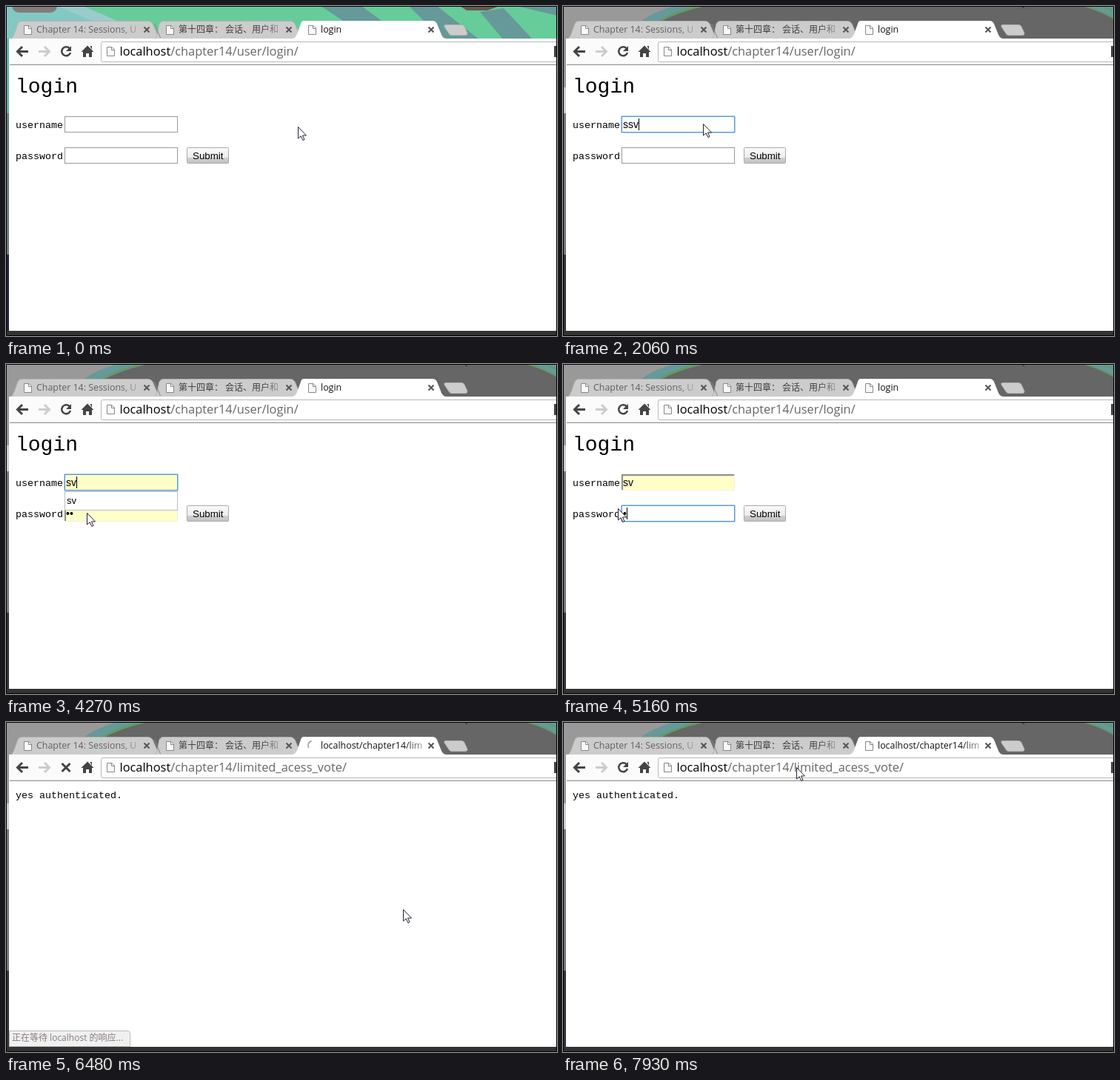
Animation of 744 by 446 pixels, one loop 8 s. Source, as an HTML page:

```html
<!DOCTYPE html>
<html lang="zh">
<head>
<meta charset="utf-8">
<title>login</title>
<style>
html, body { margin: 0; width: 100%; height: 100%; overflow: hidden; background: #000; }
svg { display: block; width: 744px; height: 446px; }
text { white-space: pre; }
.ui { font: 12px "Open Sans", "Noto Sans CJK SC", "Noto Sans CJK", sans-serif; }
.latin { font-size: 12.4px; }
.url { font: 16.4px "Open Sans", sans-serif; fill: #666; }
.mono { font: 13.33px "Liberation Mono", monospace; }
.arial { font: 14px "Liberation Sans", sans-serif; }
.field .body { fill: #fff; stroke: #999; }
.field .halo { fill: none; stroke: #a9cdf0; visibility: hidden; }
.field .inset { fill: none; stroke: #8b8b8b; stroke-width: 2; visibility: hidden; }
.field.focus .body { stroke: #5b9ad6; }
.field.focus .halo { visibility: visible; }
.field.auto .body { fill: #ffffc8; }
.field.auto:not(.focus) .body { stroke: #f0f0e4; }
.field.auto:not(.focus) .inset { visibility: visible; }
</style>
</head>
<body>
<svg viewBox="0 0 744 446">
  <defs>
    <linearGradient id="button" x2="0" y2="1">
      <stop offset="0" stop-color="#fafafa"/><stop offset=".64" stop-color="#ececec"/>
      <stop offset=".66" stop-color="#cfcfcf"/><stop offset="1" stop-color="#c2c2c2"/>
    </linearGradient>
    <linearGradient id="fade1" gradientUnits="userSpaceOnUse" x1="155" x2="188">
      <stop stop-color="#606060"/><stop offset="1" stop-color="#ccc"/>
    </linearGradient>
    <linearGradient id="fade2" gradientUnits="userSpaceOnUse" x1="345" x2="378">
      <stop stop-color="#3c3c3c"/><stop offset="1" stop-color="#bcc4c8"/>
    </linearGradient>
    <linearGradient id="fade3" gradientUnits="userSpaceOnUse" x1="540" x2="570">
      <stop stop-color="#111"/><stop offset="1" stop-color="#ddd"/>
    </linearGradient>
    <clipPath id="titleClip"><path d="M425 20H562V45H425Z"/></clipPath>
    <g id="page"><path d="M.5 .5H7L10.5 4V12.5H.5Z" fill="#f8f8f8" stroke="#888"/><path d="M6.5 .5V4.5H10.5" fill="none" stroke="#888"/></g>
    <path id="close" d="M-3.5-3.5L3.5 3.5M3.5-3.5L-3.5 3.5" stroke="#555" stroke-width="2"/>
  </defs>

  <g id="grayDesk">
    <path d="M0 0H744V446H0Z" fill="#666"/>
    <path d="M0 0H150L108 20V46H0Z" fill="#999"/>
    <path d="M150 0H184Q150 8 130 20H106Q122 8 150 0Z" fill="#669999"/>
    <path d="M186 0Q152 8 131 20" fill="none" stroke="#669966" stroke-width="3"/>
    <path d="M706 0H744V17Q728 7 706 0Z" fill="#669999"/>
    <path d="M704 0Q728 7 744 17M728 0L744 7" fill="none" stroke="#669966" stroke-width="2"/>
    <path d="M620 1l3 2" stroke="#222"/>
    <path d="M1 44H4V110H1Z" fill="#999"/><path d="M1 110H4V145H1Z" fill="#ccc"/>
    <path d="M1 145H4V336H1Z" fill="#777"/><path d="M1 336H4V446H1Z" fill="#333"/>
  </g>
  <g id="greenDesk">
    <path d="M0 0H744V446H0Z" fill="#66cc99"/>
    <path d="M0 0H84L130 20V46H0Z" fill="#84c8c4"/>
    <path d="M70 0H104L150 20H116Z" fill="#99cccc"/>
    <path d="M8 0H69Q68 9 58 9H20Q9 9 8 0Z" fill="#807d7a"/>
    <path d="M425 0H480L507 20H455ZM544 0H582L640 46H590ZM640 8L672 3L712 46H672ZM690 0H744V13Z" fill="#669999"/>
    <path d="M613 0H666L650 6H622Z" fill="#665a50"/>
    <path d="M1 44H4V145H1Z" fill="#66b5a8"/><path d="M1 145H4V336H1Z" fill="#667c7a"/>
    <path d="M1 336H4V446H1Z" fill="#222244"/>
  </g>
  <path d="M1 439H743V445H1Z" fill="#333"/>

  <g stroke="#b5b5b5" fill="#ccc">
    <path d="M5 45Q9 44 11 38L16 24Q17.500 20.500 21 20.500H192Q196 20.500 198 24L207 45Z"/>
    <path d="M201 45L204 39L207 24Q209 20.500 212 20.500H384Q388 20.500 390 24L399 45Z"/>
    <path d="M594 25.500H615Q618 25.500 619 28L623 37Q623 39.500 620 39.500H602Q599 39.500 598 37L592 28Q591 25.500 594 25.500Z"/>
  </g>
  <path d="M200.500 24L208.500 43" stroke="#888"/>
  <path d="M4 439V44H387Q391 43 393 38L398 24Q399 20 402 20H576Q580 20 582 24L588 39Q590 44 595 44H744V439Z" fill="#fff"/>
  <path d="M5 46H744V78H5Z" fill="#fbfbfb"/>
  <path d="M5 79.500H744" stroke="#999"/><path d="M5 78.500H744" stroke="#ddd"/>
  <path d="M744 48.500H131Q128.500 48.500 128.500 51V73Q128.500 75.500 131 75.500H744" fill="#fff" stroke="#b8b8b8"/>

  <use href="#page" x="24" y="26"/><use href="#page" x="216" y="26"/><use id="tabIcon" href="#page" x="408" y="26"/>
  <use href="#page" x="136" y="55"/>
  <use href="#close" x="190" y="32"/><use href="#close" x="382" y="32"/><use href="#close" x="574" y="32"/>
  <path id="spinner" d="M414 26A6 6 0 0 1 420 34" fill="none" stroke="#9aa" stroke-width="1.700"/>
  <text class="ui latin" x="41" y="36" fill="url(#fade1)">Chapter 14: Sessions, U</text>
  <text class="ui" x="233" y="36" fill="url(#fade2)">第十四章： 会话、用户和</text>
  <text class="ui latin" id="title" x="425" y="36" fill="url(#fade3)" clip-path="url(#titleClip)"></text>

  <g fill="none" stroke="#444" stroke-width="3">
    <path d="M30 61.500H17M22 55L15.500 61.500L22 68"/>
    <path d="M44 61.500H57M52 55L58.500 61.500L52 68" stroke="#ccc"/>
    <g id="reload"><path d="M85.500 57A6 6 0 1 0 87 63" stroke-width="2.500"/><path d="M88 54V61H81Z" fill="#444" stroke="none"/></g>
    <path id="stop" d="M75.500 56L86.500 67M86.500 56L75.500 67"/>
    <path d="M110 53.500L118.500 62H116V69H112V64H108V69H104V62H101.500ZM113.500 54H116V59Z" fill="#444" stroke="none"/>
  </g>
  <text class="url" x="153.500" y="67"><tspan fill="#000">localhost</tspan><tspan id="path"></tspan></text>
  <path d="M740 54H743V69H740Z" fill="#444"/>

  <g id="form">
    <text x="13" y="117" font-family="Liberation Mono, monospace" font-size="28">login</text>
    <text class="mono" x="13" y="165">username</text>
    <text class="mono" x="13" y="207">password</text>
    <g id="user" class="field" transform="translate(79 149)">
      <rect class="halo" x="-.5" y="-.5" width="154" height="23" rx="1"/>
      <rect class="body" x=".5" y=".5" width="152" height="21"/>
      <path class="inset" d="M1 21V1H152"/>
      <rect class="pick" y="3" height="16" fill="#39f"/>
      <text class="arial" x="2" y="16"></text>
      <path class="caret" d="M0 3V19" stroke="#000"/>
    </g>
    <g id="pass" class="field" transform="translate(79 191)">
      <rect class="halo" x="-.5" y="-.5" width="154" height="23" rx="1"/>
      <rect class="body" x=".5" y=".5" width="152" height="21"/>
      <path class="inset" d="M1 21V1H152"/>
      <rect class="pick" y="3" height="16" fill="#39f"/>
      <text class="arial" x="2" y="16"></text>
      <path class="caret" d="M0 3V19" stroke="#000"/>
    </g>
    <rect id="submit" x="244.500" y="191.500" width="56" height="21" rx="1" fill="url(#button)"/>
    <text x="252" y="207" font-family="Liberation Sans, sans-serif" font-size="13.330">Submit</text>
    <g id="suggest">
      <rect x="79.500" y="172.500" width="152" height="25" fill="#fff" stroke="#bbb"/>
      <text class="arial" x="82" y="189" style="font-size:13px">sv</text>
    </g>
    <g id="ime">
      <rect x="96.500" y="175.500" width="384" height="63" fill="#fff" stroke="#aaa"/>
      <path d="M102 206.500H475" stroke="#ddd"/>
      <text class="ui" x="106" y="197" style="font-size:15px">ssv</text>
      <text class="ui" x="106" y="228" style="font-size:15px">1.试试  2.舒适  3.说是  4.收拾  5.实施</text>
    </g>
  </g>
  <text id="answer" class="mono" x="13" y="103">yes authenticated.</text>
  <g id="status">
    <path id="bubble" d="M4.500 417.500H164Q167.500 417.500 167.500 421V438.500H4.500Z" fill="#f0f0f0" stroke="#bbb"/>
    <text class="ui" x="8" y="431" fill="#857a83">正在等待 localhost 的响应...</text>
  </g>
  <path d="M.500 .500H743.500V445.500H.500Z" fill="none" stroke="#000"/>
  <path id="pointer" d="M.500 .500V16L4.200 12.800L6.800 18.500L9 17.500L6.500 12H11.500Z" fill="#fff" stroke="#223"/>
</svg>
<script>
const LOOP = 8000;
const $ = id => document.getElementById(id);
const show = (id, on) => $(id).setAttribute('visibility', on ? 'visible' : 'hidden');
const within = (t, a, b) => t >= a && t < b;

// Pointer legs: start, end, number of steps, destination
const legs = [
  [100, 550, 9, 189, 158], [1550, 1550, 1, 189, 159], [2400, 2400, 1, 188, 159],
  [2710, 2940, 4, 42, 159], [3020, 3020, 1, 49, 157], [3320, 3320, 1, 50, 156],
  [3940, 3940, 1, 58, 163], [4120, 4270, 3, 109, 201], [4340, 4340, 1, 111, 206],
  [4400, 4460, 2, 110, 200], [4750, 4980, 5, 74, 195], [5300, 5600, 6, 274, 214],
  [5660, 5720, 2, 273, 204], [6010, 6650, 10, 609, 266], [6950, 7060, 3, 603, 256],
  [7410, 7930, 10, 315, 61]
];
function pointerAt(t) {
  let x = 394, y = 163;
  for (const [start, end, count, toX, toY] of legs) {
    if (t < start) break;
    const step = end > start ? Math.floor((t - start) / (end - start) * (count - 1)) + 1 : count;
    const p = Math.min(1, step / count), ease = p * p * (3 - 2 * p);
    x += (toX - x) * ease;
    y += (toY - y) * ease;
  }
  return [Math.round(x), Math.round(y)];
}

// Typed text: time, value
const userText = [[0, ''], [1060, 'ss'], [1240, 'ssv'], [3200, 's'], [3260, 'sv']];
const passText = [[0, ''], [3320, '••'], [5160, '•'], [5230, '••']];
const valueAt = (steps, t) => steps.filter(s => s[0] <= t).pop()[1];

function drawField(id, text, charWidth, { focus, auto, blink, dragX }) {
  const field = $(id), end = 2 + text.length * charWidth;
  field.setAttribute('class', 'field' + (focus ? ' focus' : '') + (auto ? ' auto' : ''));
  const from = dragX === undefined ? end
    : 2 + charWidth * Math.max(0, Math.min(text.length, Math.round((dragX - 81) / charWidth)));
  const pick = field.querySelector('.pick'), label = field.querySelector('text');
  pick.setAttribute('x', from);
  pick.setAttribute('width', end - from);
  label.textContent = text;
  label.setAttribute('fill', from === 2 && text ? '#fff' : '#000');
  const caret = field.querySelector('.caret');
  caret.setAttribute('transform', `translate(${Math.round(end) + .5} 0)`);
  caret.style.visibility = focus && !blink && from === end ? 'inherit' : 'hidden';
}

function render(t) {
  const [x, y] = pointerAt(t);
  $('pointer').setAttribute('transform', `translate(${x} ${y})`);
  $('greenDesk').setAttribute('opacity', t < 100 ? 1 : Math.max(0, 1 - (Math.floor((t - 100) / 56) + 1) / 9));

  drawField('user', valueAt(userText, t), 7, {
    focus: within(t, 550, 4400), auto: t >= 3320, blink: within(t, 1860, 2060),
    dragX: within(t, 2710, 3200) ? x : undefined
  });
  drawField('pass', valueAt(passText, t), 4.9, {
    focus: within(t, 4400, 5720), auto: within(t, 3320, 5160),
    dragX: within(t, 4750, 5160) ? x : undefined
  });
  $('submit').setAttribute('stroke', t >= 5500 ? '#777' : '#aaa');

  const loaded = t >= 6220, loading = within(t, 5870, 6650);
  show('ime', within(t, 1240, 2060));
  show('suggest', within(t, 3200, 4400));
  $('form').style.display = loaded ? 'none' : '';
  show('answer', loaded);
  show('stop', loading);
  show('reload', !loading);
  show('spinner', loading);
  show('tabIcon', !loading);
  $('spinner').setAttribute('transform', `rotate(${Math.floor((t - 5870) / 70) * 30} 414 32)`);
  $('title').textContent = loaded ? 'localhost/chapter14/limited_acess_vote/' : 'login';
  $('path').textContent = loaded ? '/chapter14/limited_acess_vote/' : '/chapter14/user/login/';

  show('status', within(t, 6010, 7060));
  $('status').setAttribute('opacity', t < 6900 ? 1 : .7 - .2 * Math.floor((t - 6900) / 53));
  $('bubble').setAttribute('opacity', t < 6900 ? 1 : 0);
}

const origin = performance.now();
function tick() {
  render((performance.now() - origin) % LOOP);
  requestAnimationFrame(tick);
}
tick();
</script>
</body>
</html>
```
